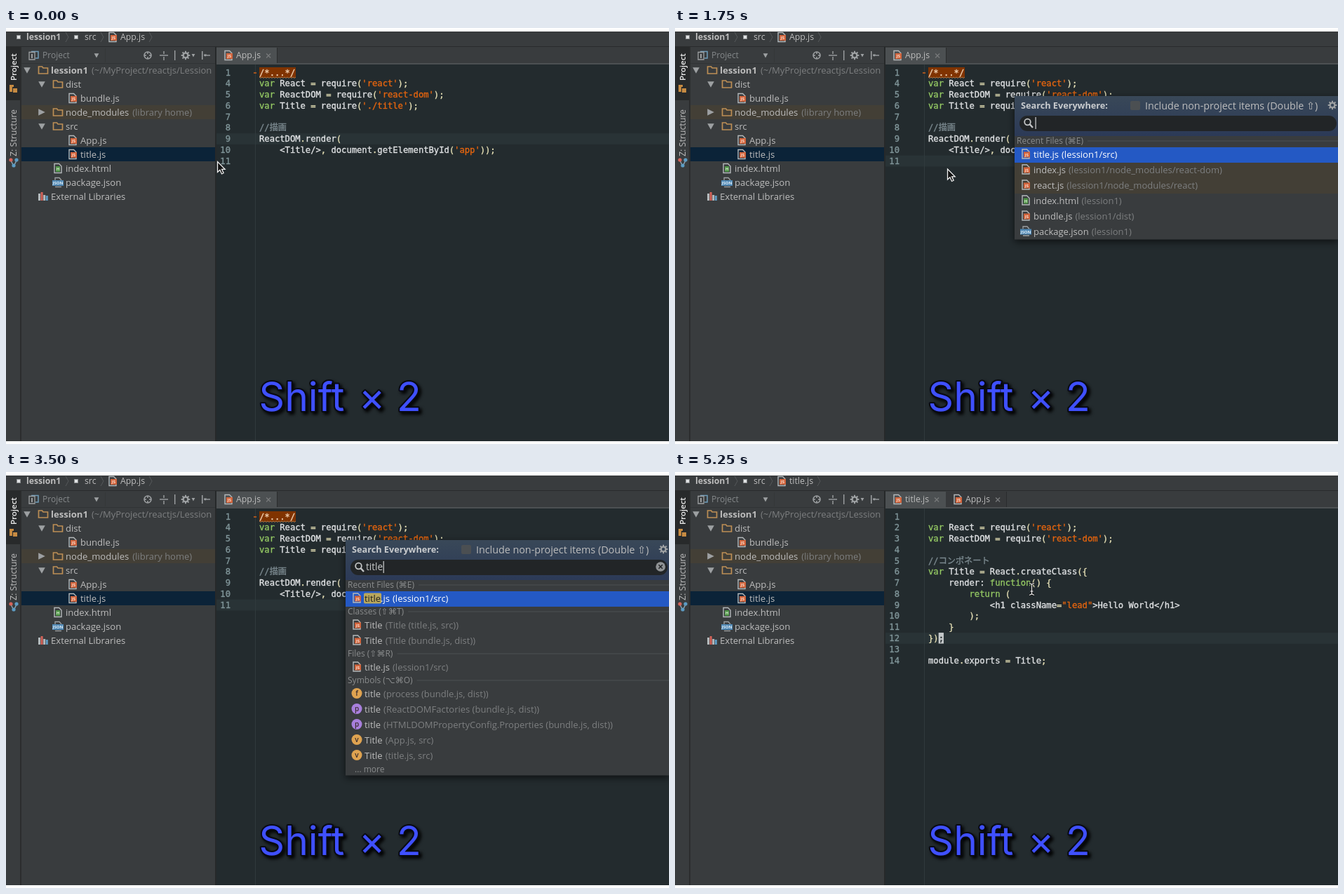
Recreate the animation shown at these times as an HTML page with a canvas. Size 945 by 593 pixels, loop 5.6 s.

```html
<!DOCTYPE html>
<html lang="ja">
<head>
<meta charset="utf-8">
<title>Search Everywhere</title>
<style>
  html, body { margin: 0; height: 100%; overflow: hidden; background: #fff; }
  canvas { display: block; }
</style>
</head>
<body>
<canvas id="stage" width="945" height="593"></canvas>
<script>
const ctx = document.getElementById('stage').getContext('2d');
const STEP = 350, STEPS = 16;
const BOTTOM = 589, LINE_H = 15.77;
const UI = '"Open Sans", "DejaVu Sans", sans-serif';
const MONO = '12.17px "DejaVu Sans Mono", "Noto Sans CJK JP", monospace';
const C = {
  panel: '#393c3e', editor: '#232b2e', line: '#293336', text: '#bdbdbd', dim: '#7d7f80',
  blue: '#2459c4', brown: '#433f36', orange: '#d2643c', folder: '#bd8f55', icon: '#9da0a2'
};

const APP = {
  name: 'App.js', numbers: [1, 4, 5, 6, 7, 8, 9, 10, 11],
  code: ['/*...*/', "var React = require('react');", "var ReactDOM = require('react-dom');",
    "var Title = require('./title');", '', '//描画', 'ReactDOM.render(',
    "    <Title/>, document.getElementById('app'));", '']
};
const TITLE = {
  name: 'title.js', numbers: Array.from({ length: 14 }, (_, i) => i + 1),
  code: ['', "var React = require('react');", "var ReactDOM = require('react-dom');", '',
    '//コンポネート', 'var Title = React.createClass({', '    render: function() {',
    '        return (', '            <h1 className="lead">Hello World</h1>', '        );',
    '    }', '});', '', 'module.exports = Title;']
};

// Rows: [icon, name, detail, from library]; a lone string is a heading.
const RECENT = ['Recent Files (⌘E)', ['js', 'title.js', '(lession1/src)'],
  ['js', 'index.js', '(lession1/node_modules/react-dom)', true],
  ['js', 'react.js', '(lession1/node_modules/react)', true],
  ['html', 'index.html', '(lession1)'], ['js', 'bundle.js', '(lession1/dist)'],
  ['json', 'package.json', '(lession1)']];
const CLASSES = ['Classes (⇧⌘T)', ['js', 'Title', '(Title (title.js, src))'],
  ['js', 'Title', '(Title (bundle.js, dist))']];
const FILES = ['Files (⇧⌘R)', ['js', 'title.js', '(lession1/src)']];
const SYMBOLS = ['Symbols (⌥⌘O)', ['f', 'title', '(process (bundle.js, dist))'],
  ['p', 'title', '(ReactDOMFactories (bundle.js, dist))'],
  ['p', 'title', '(HTMLDOMPropertyConfig.Properties (bundle.js, dist))'],
  ['v', 'Title', '(App.js, src)'], ['v', 'Title', '(title.js, src)']];
const FOUND = [...RECENT.slice(0, 2), ...CLASSES, ...FILES, ...SYMBOLS, '... more'];
const lib = name => ['js', name, '(lession1/node_modules/react/lib)', true];
const BROAD = [...RECENT.slice(0, 2), ...CLASSES, '... more', ...FILES,
  ...['testing.js', 'timing.js', 'utils.js', 'events.js'].map(lib), '... more', ...SYMBOLS, '... more'];

function rect(x, y, w, h, color) {
  ctx.fillStyle = color;
  ctx.fillRect(x, y, w, h);
}

function text(str, x, cy, color = C.text, size = 13, weight = 400) {
  ctx.font = `${weight} ${size}px ${UI}`;
  ctx.fillStyle = color;
  ctx.fillText(str, x, cy + size * 0.35);
  return x + ctx.measureText(str).width;
}

function line(points, color, width = 1, close = false) {
  ctx.beginPath();
  points.forEach(([x, y]) => ctx.lineTo(x, y));
  if (close) ctx.closePath();
  ctx.strokeStyle = color;
  ctx.lineWidth = width;
  ctx.stroke();
}

function shape(points, color) {
  ctx.beginPath();
  points.forEach(([x, y]) => ctx.lineTo(x, y));
  ctx.fillStyle = color;
  ctx.fill();
}

function disc(x, y, r, color, stroke) {
  ctx.beginPath();
  ctx.arc(x, y, r, 0, 7);
  if (stroke) { ctx.strokeStyle = color; ctx.lineWidth = stroke; ctx.stroke(); }
  else { ctx.fillStyle = color; ctx.fill(); }
}

function rounded(x, y, w, h, r, color) {
  ctx.beginPath();
  ctx.roundRect(x, y, w, h, r);
  ctx.fillStyle = color;
  ctx.fill();
}

function centered(str, x, cy, color, size, weight) {
  ctx.textAlign = 'center';
  text(str, x, cy, color, size, weight);
  ctx.textAlign = 'left';
}

// Icons are placed by their centre.
function icon(kind, x, y) {
  if (kind === 'folder') {
    line([[x - 6.5, y + 5], [x - 6.5, y - 5], [x - 1.5, y - 5], [x, y - 3], [x + 6.5, y - 3], [x + 6.5, y + 5]],
      C.folder, 1.7, true);
  } else if (kind === 'json') {
    line([[x - 4, y - 3], [x - 4, y - 6.5], [x + 2, y - 6.5], [x + 5, y - 3]], C.icon, 1.3);
    rect(x - 8, y - 3, 16, 8, '#4f88b5');
    centered('JSON', x, y + 1, '#e4eef5', 6, 700);
    line([[x - 4, y + 6.5], [x + 5, y + 6.5]], C.icon, 1.3);
  } else if (kind === 'libs') {
    [['#b4babd', 10], ['#d5645a', 12], ['#b4babd', 8], ['#5d9cc4', 7]]
      .forEach(([color, h], i) => rect(x - 7 + i * 3.6, y + 6 - h, 3, h, color));
  } else if (kind.length === 1) {
    disc(x, y, 7.5, kind === 'p' ? '#a87fdc' : '#dfa350');
    centered(kind, x, y, '#3a2c2c', 10, 600);
  } else {
    const html = kind === 'html';
    line([[x - 5, y - 6.5], [x + 1.5, y - 6.5], [x + 5, y - 3], [x + 5, y + 6.5], [x - 5, y + 6.5]], '#b5b9bb', 1.4, true);
    rect(x - 3, y - 3, html ? 6 : 9, 8, html ? '#4d9245' : C.orange);
    centered(html ? 'H' : 'JS', html ? x : x + 1.5, y + 1, html ? '#d8efd0' : '#fbe3d6', 6, 700);
  }
}

function triangle(x, y, r, color, right) {
  shape(right ? [[x - r, y - r], [x + r, y], [x - r, y + r]] : [[x - r, y - r * .8], [x + r, y - r * .8], [x, y + r]], color);
}

function gear(x, y) {
  for (let a = 0; a < 8; a++) {
    const c = Math.cos(a * Math.PI / 4), s = Math.sin(a * Math.PI / 4);
    line([[x + c * 3, y + s * 3], [x + c * 6.3, y + s * 6.3]], C.icon, 2);
  }
  disc(x, y, 3.4, C.icon, 2.4);
}

function cross(x, y, r, color, width) {
  line([[x - r, y - r], [x + r, y + r]], color, width);
  line([[x - r, y + r], [x + r, y - r]], color, width);
}

function breadcrumb(file) {
  rect(0, 5, 945, 22, C.panel);
  rect(0, 26, 945, 1, '#292b2c');
  const chevron = x => line([[x - 2, 6], [x + 2, 13], [x - 2, 20]], '#55585a');
  [18, 100].forEach(x => { rect(x - 3, 10, 6, 6, '#8b8e90'); rect(x - 2, 11, 4, 4, '#e0e2e3'); });
  text('lession1', 29, 13, C.text, 12.2, 700);
  chevron(87);
  chevron(137);
  text('src', 112, 13, C.text, 12.3);
  icon('js', 152, 13);
  chevron(text(file.name, 163, 13, C.text, 12.3) + 8);
}

function vertical(str, bottom, color, size, weight) {
  ctx.save();
  ctx.translate(11, bottom);
  ctx.rotate(-Math.PI / 2);
  text(str, 0, 0, color, size, weight);
  ctx.restore();
}

function sidebar() {
  rect(0, 27, 299, BOTTOM - 27, C.panel);
  rect(0, 27, 20, 76, '#282a2b');
  rect(20, 27, 2, BOTTOM - 27, '#2b2d2e');
  vertical('Project', 75, '#eee', 11.5, 600);
  vertical('Z: Structure', 183, C.text, 12.4);
  rect(5, 81, 6, 10, '#c78b42');
  rect(9, 84, 8, 9, '#282a2b');
  rect(10, 86, 6, 6, '#c78b42');
  line([[7, 189], [11, 197], [15, 189]], '#8fa7b8', 1.4);
  [[7, 188, '#d5645a'], [15, 188, '#5d9cc4'], [11, 196, '#5d9cc4']].forEach(([x, y, c]) => disc(x, y, 2.6, c));

  line([[36, 33.5], [46, 33.5], [46, 43], [42, 43]], '#6f9dba', 1.5);
  line([[33, 34.5], [41, 34.5], [41, 45], [33, 45]], C.icon, 1.3, true);
  rect(36, 37, 2, 6, C.icon);
  text('Project', 52, 39, '#85898b', 12);
  triangle(129, 39, 3.4, C.icon);
  rect(141, 29, 1, 20, '#343738');
  disc(202, 39, 5, C.icon, 1.6);
  [[0, 1], [1, 0], [0, -1], [-1, 0]].forEach(([a, b]) =>
    line([[202 + a * 2, 39 + b * 2], [202 + a * 5, 39 + b * 5]], C.icon, 1.6));
  line([[219, 39], [231, 39]], C.icon, 1.4);
  line([[225, 33], [225, 37]], C.icon, 1.4);
  line([[225, 41], [225, 46]], C.icon, 1.4);
  rect(240, 32, 1.4, 14, C.icon);
  gear(256, 39);
  triangle(267, 39, 2.4, C.icon);
  rect(279, 33, 1.5, 12, C.icon);
  line([[291, 39], [282, 39]], C.icon, 1.4);
  triangle(284, 39, 2, C.icon);
  rect(22, 50, 277, 1, '#313435');

  rect(22, 110, 277, 20, C.brown);
  rect(22, 170, 277, 20, '#0b2338');
  ctx.save();
  ctx.beginPath();
  ctx.rect(0, 0, 298, 593);
  ctx.clip();
  // [indent level, icon, name, note, arrow: 1 open, 2 closed]
  [[0, 'folder', 'lession1', '(~/MyProject/reactjs/Lession', 1], [1, 'folder', 'dist', '', 1],
    [2, 'js', 'bundle.js'], [1, 'folder', 'node_modules', '(library home)', 2], [1, 'folder', 'src', '', 1],
    [2, 'js', 'App.js'], [2, 'js', 'title.js'], [1, 'html', 'index.html'], [1, 'json', 'package.json'],
    [0, 'libs', 'External Libraries']
  ].forEach(([level, kind, name, note, arrow], i) => {
    const x = 64 + level * 21, y = 60 + i * 20;
    if (arrow) triangle(x - 34, y, 4.8, C.icon, arrow === 2);
    icon(kind, x - 11, y);
    const end = text(name, x, y, C.text, 13.1, i ? 400 : 700);
    if (note) text(note, end + 5, y, C.dim);
  });
  ctx.restore();
  rect(298, 27, 2, BOTTOM - 27, '#26292a');
}

function tabs(files) {
  rect(300, 27, 645, 25, C.panel);
  files.forEach((file, i) => {
    const x = 300 + i * 86;
    rect(x, 28, 86, 24, i ? '#37393b' : '#4c5052');
    rect(x + 86, 28, 1, 24, '#2a2c2d');
    icon('js', x + 17, 39);
    cross(text(file.name, x + 28, 39, C.text, 12.3) + 11, 39.5, 3, '#77797a', 1.3);
  });
  rect(300, 50, 645, 2, '#4c5052');
}

const TOKENS = /(\/[/*].*)|('[^']*'|"[^"]*")|\b(var|function|return)\b|([(){};=,.]+)|([^'"(){};=,.\s/]+|\s+|\/)/g;
const TOKEN_COLORS = ['#7b898f', '#e5650f', '#93c763', '#e8e2b7', '#e0e2e4'];

// A hairline stroke gives the slightly heavier look of the editor font.
function mono(str, x, y, color) {
  ctx.font = MONO;
  ctx.fillStyle = ctx.strokeStyle = color;
  ctx.lineWidth = 0.35;
  ctx.fillText(str, x, y);
  ctx.strokeText(str, x, y);
  return x + ctx.measureText(str).width;
}

function codeLine(str, x, y) {
  for (const match of str.matchAll(TOKENS)) {
    x = mono(match[0], x, y, TOKEN_COLORS[match.slice(1).findIndex(Boolean)]);
  }
}

function editor(file, current, caretCol) {
  rect(300, 52, 645, BOTTOM - 52, C.editor);
  rect(300, 55.6 + current * LINE_H, 645, LINE_H, C.line);
  rect(355, 52, 1, BOTTOM - 52, '#303a3d');
  file.code.forEach((str, i) => {
    const y = 67.5 + i * LINE_H;
    ctx.textAlign = 'right';
    mono(file.numbers[i], 320, y, '#81969a');
    ctx.textAlign = 'left';
    if (str.startsWith('/*')) {
      rect(361, 56, 52, 15, '#803300');
      mono(str, 361, y, '#f0d2b4');
      line(Array.from({ length: 27 }, (_, k) => [361 + k * 2, 70 + k % 2 * 1.5]), '#b98a5c', .8);
      line([[353, 64], [357, 64]], '#a5531e', 2);
    } else codeLine(str, 361, y);
  });
  if (caretCol >= 0) {
    const x = 361 + caretCol * 7.33, y = 55.6 + current * LINE_H;
    rect(x, y, 7.3, 15.5, '#c4c8c9');
    mono(file.code[current][caretCol] || '', x, y + 11.9, C.editor);
  }
}

function resultRow([kind, name, detail, library], y, selected, query) {
  if (selected || library) rect(484, y, 461, 22, selected ? C.blue : C.brown);
  icon(kind, 500, y + 9.5);
  let x = 511;
  if (selected && query) {
    ctx.font = `13px ${UI}`;
    const w = ctx.measureText(query).width;
    rounded(x - 1, y + 2.5, w + 2, 15, 2, '#b9a75c');
    x = text(name.slice(0, query.length), x, y + 10, '#1d1d1d');
    name = name.slice(query.length);
  }
  x = text(name, x, y + 10, selected ? '#fff' : C.text);
  text(detail, x + 4, y + 10, selected ? '#fff' : C.dim);
}

function popup(items, query, selected, caret) {
  const height = item => typeof item !== 'string' ? 22 : item === '... more' ? 17 : 16;
  const bottom = Math.min(BOTTOM, items.reduce((y, item) => y + height(item), 153.5));
  ctx.save();
  ctx.shadowColor = 'rgba(0,0,0,.6)';
  ctx.shadowBlur = 10;
  ctx.shadowOffsetY = 3;
  rect(484, 97, 461, bottom - 97, C.panel);
  ctx.restore();
  const header = ctx.createLinearGradient(0, 97, 0, 153);
  header.addColorStop(0, '#394858');
  header.addColorStop(1, '#2c3a57');
  rect(484, 97, 461, 57, header);
  text('Search Everywhere:', 493, 111, '#c8cbce', 12.7, 700);
  rounded(649, 104, 14, 13, 2, '#4b4f52');
  text('Include non-project items (Double ⇧)', 670, 111, C.text, 14.3);
  gear(937, 110);

  rounded(491, 125, 452, 22, 11, '#222527');
  disc(502.5, 134, 4.3, '#c4c6c7', 1.8);
  line([[505.5, 137], [510, 142]], '#c4c6c7', 2.4);
  const end = text(query, 513, 135, '#c9cbcc', 13.6);
  if (caret) rect(end + .5, 127, 1.2, 17, '#d0d2d3');
  if (query) {
    disc(933, 135, 6.8, '#8f9294');
    cross(933, 135, 2.7, '#222527', 1.6);
  }

  ctx.save();
  ctx.beginPath();
  ctx.rect(484, 97, 461, bottom - 97);
  ctx.clip();
  let y = 153.5, index = 0;
  for (const item of items) {
    if (item === '... more') text(item, 497, y + 8.5, '#8a8c8d', 12);
    else if (typeof item === 'string') {
      const x = text(item, 487, y + 7.5, '#8a8c8d', 12);
      rect(x + 6, y + 7, 945, 1, '#4d5052');
    } else resultRow(item, y + .5, index++ === selected, query);
    y += height(item);
  }
  ctx.restore();
}

function arrow(x, y) {
  const outline = [[0, 0], [0, 15], [3.4, 11.8], [6, 17.5], [8.6, 16.3], [6.1, 10.8], [10.6, 10.8]]
    .map(([a, b]) => [x + a, y + b]);
  shape(outline, '#111');
  line(outline, '#f2f2f2', 1.3, true);
}

function beam(x, y) {
  [['#111', 3], ['#eee', 1.2]].forEach(([color, w]) => {
    line([[x - 3.5, y - 8.5], [x, y - 7], [x + 3.5, y - 8.5]], color, w);
    line([[x, y - 7], [x, y + 7]], color, w);
    line([[x - 3.5, y + 8.5], [x, y + 7], [x + 3.5, y + 8.5]], color, w);
    line([[x - 2, y + 3], [x + 2, y + 3]], color, w);
  });
}

function caption() {
  ctx.save();
  ctx.font = '57px Inter, "DejaVu Sans", sans-serif';
  ctx.textAlign = 'center';
  ctx.lineJoin = 'round';
  ctx.lineWidth = 4;
  ctx.strokeStyle = '#080a14';
  ctx.shadowColor = '#000';
  ctx.shadowBlur = 4;
  ctx.shadowOffsetX = ctx.shadowOffsetY = 3;
  const parts = [['Shift', 421.5], ['×', 521.5], ['2', 574.5]];
  parts.forEach(([str, x]) => ctx.strokeText(str, x, 546));
  ctx.shadowColor = 'transparent';
  ctx.fillStyle = '#3f50ff';
  parts.forEach(([str, x]) => ctx.fillText(str, x, 546));
  ctx.restore();
}

function draw(step) {
  const opened = step >= 13;
  const file = opened ? TITLE : APP;
  rect(0, 0, 945, 593, '#fff');
  breadcrumb(file);
  sidebar();
  tabs(opened ? [TITLE, APP] : [APP]);
  if (opened) editor(TITLE, 11, 2);
  else editor(APP, step < 2 ? 6 : 8, step === 2 || step === 3 ? 0 : -1);

  if (step >= 3 && !opened) {
    const query = step < 6 ? '' : step === 6 ? 'ti' : step === 7 ? 'titl' : 'title';
    const items = step < 5 ? [] : step === 5 ? RECENT : step === 6 ? BROAD : FOUND;
    popup(items, query, step < 11 ? 0 : step === 11 ? 2 : 3, step > 3);
  }
  // The pointer hides while typing.
  if (step === 0) arrow(301.5, 190.5);
  else if (step < 6) arrow(388.5, 201);
  else if (step >= 14) beam(508.5, 167);
  caption();
}

let shown = -1;
function tick(now) {
  const step = Math.floor(now / STEP) % STEPS;
  if (step !== shown) draw(shown = step);
  requestAnimationFrame(tick);
}
tick(performance.now());
</script>
</body>
</html>
```
